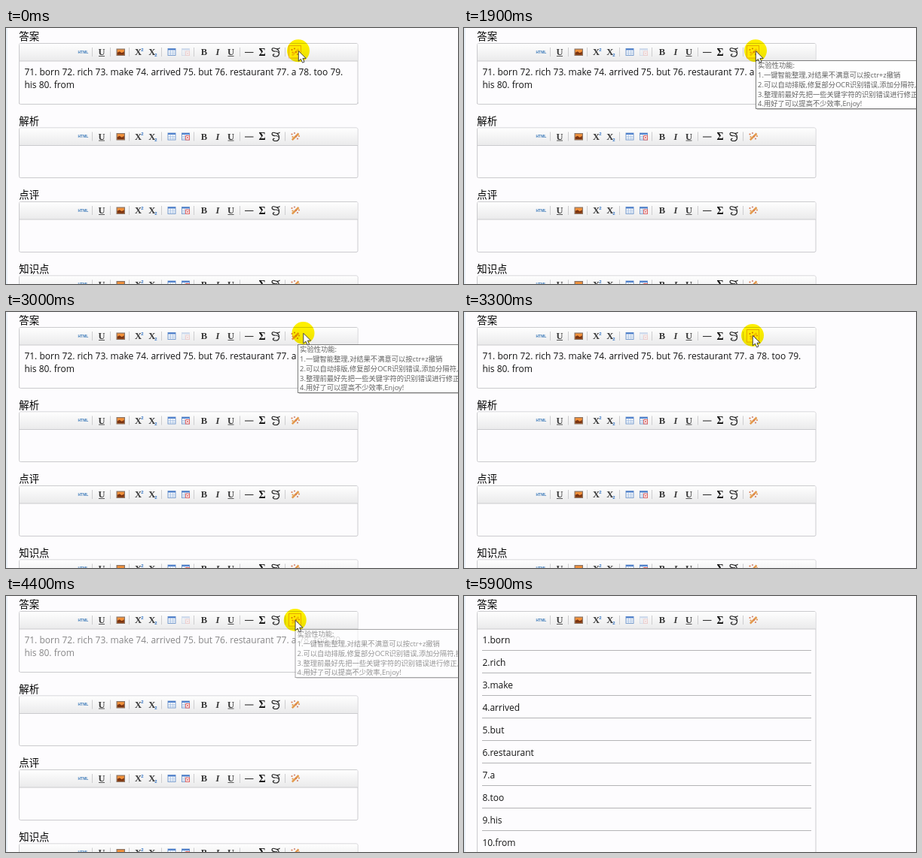
An HTML page for the animation above (6.5 s loop, 600 px wide and 341 px high).

```html
<!DOCTYPE html>
<html lang="zh">
<meta charset="utf-8">
<style>
html, body { margin: 0; width: 100%; height: 100%; overflow: hidden; background: #fdfcfe; }
svg { display: block; width: 100%; height: 100%; }
text { font-family: "Open Sans", "Noto Sans CJK SC", "Noto Sans CJK", sans-serif; white-space: pre; }
.head { font-size: 13.4px; fill: #000; }
.body { font-size: 12px; fill: #141414; }
.tip { font-size: 9.3px; fill: #606060; }
.serif { font: bold 12.5px "Liberation Serif", serif; fill: #383838; text-anchor: middle; }
.slant { font-style: italic; }
.sum { font-size: 14px; fill: #111; }
.mini { font: bold 6px "Liberation Sans", sans-serif; fill: #3b78c4; }
.html { font: bold 5px "Liberation Sans", sans-serif; fill: #3f7cba; }
#spot { mix-blend-mode: multiply; }
</style>
<svg id="stage" viewBox="0 0 600 341" preserveAspectRatio="none">
  <defs>
    <linearGradient id="steel" x2="0" y2="1">
      <stop stop-color="#fefefe"/><stop offset="1" stop-color="#eaeaeb"/>
    </linearGradient>
  </defs>
  <rect width="2" height="341" fill="#e9f0f8"/>
  <g id="page"></g>
  <g id="plain"></g>
  <g id="list"></g>
  <circle id="spot" r="15" fill="#fff200"/>
  <g id="tip"></g>
  <path id="arrow" d="M0 0V13.5L3.1 10.7L5.3 15.6L7.7 14.6L5.6 9.8H9.8Z" fill="#fff" stroke="#333" stroke-width=".9"/>
</svg>
<script>
const $ = id => document.getElementById(id);
const text = (cls, x, y, s) => `<text class="${cls}" x="${x}" y="${y}">${s}</text>`;
const rect = (x, y, w, h, attrs) => `<rect x="${x}" y="${y}" width="${w}" height="${h}" ${attrs}/>`;
const line = (d, color, w = 1) => `<path d="${d}" fill="none" stroke="${color}" stroke-width="${w}"/>`;

// Icons are drawn around y = 0, the middle of the toolbar.
const table = x =>
  rect(x, -4.5, 10, 9, 'fill="#fff" stroke="#6c93c9" stroke-width=".9"') +
  rect(x, -4.5, 10, 2, 'fill="#4f80cc"') +
  line(`M${x} 0h10M${x} 2.3h10M${x + 3.3} -3v7.5M${x + 6.7} -3v7.5`, '#9bb8de', .7);

const picture =
  rect(146.5, -4.5, 11.5, 9.5, 'fill="#8a7466"') +
  rect(147.7, -3.3, 9.1, 7.1, 'fill="#f2913a"') +
  '<path d="M147.7 3.8v-3l3-1.5 3 2 3.1-2v4.5z" fill="#7a3412"/>';

const underlined = x => text('serif', x, 4, 'U') + line(`M${x - 4} 5.5h8`, '#555');

const script =
  line('M357.5 -1C351.5 -.5 352 -6.5 356.5 -5S361 -4 363.5 -5.5', '#222', 1.2) +
  line('M359.5 -4.3C364 -1 363.5 6 358 6C353.5 6 353.5 2.5 356.5 3', '#222', 1.2) +
  line('M357.5 -1Q360 -1.5 362 1', '#222');

const sparks = [[379.5, -3, '#dc7a50'], [383, -4.5, '#d08878'], [389, -.5, '#e09050'],
  [387, 3, '#d0806a'], [380.5, .5, '#e69a48'], [385, 0, '#d8785a']]
  .map(([x, y, c]) => `<circle cx="${x}" cy="${y}" r="1.1" fill="${c}"/>`).join('');
const stick = line('M379.8 4.7L388.5 -4', '#e39a4c', 2.5);

function toolbar(first) {
  const bars = [114.5, 138.5, 163.5, 206.5, 249.5, 310.5, 370.5].map(x => `M${x} -6v12`).join('');
  return line(bars, '#cdcdcf') + text('html', 95.5, 1.8, 'HTML') + underlined(127) + picture +
    text('serif', 175.5, 4, 'X') + text('mini', 179.2, -1.5, '2') +
    text('serif', 193.7, 4, 'X') + text('mini', 197.2, 6, '2') +
    table(215) +
    `<g opacity="${first ? .25 : 1}">${table(233.5)}${
      rect(238.5, -1, 5, 5.5, 'fill="#fff" stroke="#dc6464"')}${
      line('M239.8 .4l2.6 2.6m0-2.6l-2.6 2.6', '#dc6464')}</g>` +
    text('serif', 263, 4, 'B') + text('serif slant', 281, 4, 'I') + underlined(298.5) +
    line('M317 .5h11.5', '#333', 1.1) + text('serif sum', 340, 4.6, 'Σ') + script +
    (first ? `<g id="hover">${rect(375.5, -8.5, 16, 16.5, 'fill="#fff6ea" stroke="#e6b49c"')}</g>` : '') +
    `<g ${first ? 'id="stick"' : ''}>${stick}</g>` + sparks;
}

function editor(title, y, h, first) {
  return text('head', 17.3, y - 4.4, title) +
    rect(17.5, y, 449.5, h, 'rx="2" fill="#fdfcfe" stroke="#cbcbce"') +
    rect(18, y + .5, 448.5, 23, 'fill="url(#steel)"') +
    line(`M18 ${y + 23.5}h449`, '#cbcbce') +
    `<g transform="translate(0 ${y + 11.5})">${toolbar(first)}</g>`;
}

const tail = [['解析', 133, 66.5], ['点评', 231.5, 67], ['知识点', 330, 67]];
$('page').innerHTML = editor('答案', 20.5, 400, true);
$('plain').innerHTML =
  rect(10, 101, 470, 240, 'fill="#fdfcfe"') +
  line('M17.5 99V100Q17.5 101.5 19.5 101.5H465Q467 101.5 467 99.5V99', '#cbcbce') +
  tail.map(([s, y, h]) => editor(s, y, h)).join('') +
  '<g id="answer">' +
  text('body', 24.4, 63, '71. born 72. rich 73. make 74. arrived 75. but 76. restaurant 77. a 78. too 79.') +
  text('body', 24.4, 79.5, 'his 80. from') + '</g>';

$('list').innerHTML = 'born rich make arrived but restaurant a too his from'.split(' ').map((word, i) =>
  text('body', 24.4, 63 + i * 30, `${i + 1}.${word}`) +
  line(`M24 ${72.5 + i * 30}h437`, '#b4b4b6')).join('');

$('tip').innerHTML =
  rect(1.5, 1.5, 240, 64, 'fill="#000" opacity=".2"') +
  rect(0, 0, 240, 64, 'fill="#fefefe" stroke="#7c7c7c"') +
  ['实验性功能:', '1.一键智能整理,对结果不满意可以按ctr+z撤销',
    '2.可以自动排版,修复部分OCR识别错误,添加分隔符,换行',
    '3.整理前最好先把一些关键字符的识别错误进行修正,',
    '4.用好了可以提高不少效率,Enjoy!']
    .map((s, i) => text('tip', 2.6, 9.8 + i * 12.75, s)).join('');

// Keys: time, then values, joined by straight lines.
const path = [[0, 388, 30.3], [1800, 388, 30.3], [1900, 387, 30.3], [2200, 385.5, 32], [2500, 388, 31],
  [2600, 388, 31], [2800, 377, 24], [3000, 394.5, 28], [3300, 383, 31], [3500, 384, 32],
  [4300, 384, 32], [4500, 383.5, 32], [5400, 383.5, 32], [5500, 384, 38], [5600, 392, 82],
  [5700, 411, 185], [5800, 435, 315], [5900, 450, 380]];
const fade = [[300, 0], [700, 1], [3000, 1], [3300, 0], [3700, 0], [3960, 1], [4300, 1], [4600, 0]];

function at(keys, t) {
  const i = keys.findIndex(k => k[0] > t);
  if (i < 1) return (i ? keys[keys.length - 1] : keys[0]).slice(1);
  const a = keys[i - 1], b = keys[i], p = (t - a[0]) / (b[0] - a[0]);
  return a.slice(1).map((v, j) => v + (b[j + 1] - v) * p);
}

const show = (id, on) => $(id).style.display = on ? '' : 'none';
const move = (id, x, y) => $(id).setAttribute('transform', `translate(${x} ${y})`);
const alpha = (id, v) => $(id).setAttribute('opacity', v);

function draw(t) {
  const [x, y] = at(path, t), done = t >= 4500;
  const hover = Math.abs(x - 383.5) < 8 && Math.abs(y - 32) < 8;
  move('spot', x, y);
  move('arrow', x + .3, y + .3);
  move('tip', t < 3500 ? 387.5 : 384, t < 3500 ? 43.5 : 44.5);
  alpha('tip', at(fade, t)[0]);
  alpha('answer', t < 4400 ? 1 : .5);
  alpha('stick', !hover ? 1 : done ? 0 : .45);
  show('hover', hover);
  show('plain', !done);
  show('list', done);
}

function tick(now) {
  draw(Math.floor(now % 6500 / 100) * 100);
  requestAnimationFrame(tick);
}
tick(performance.now());
</script>
</html>
```
